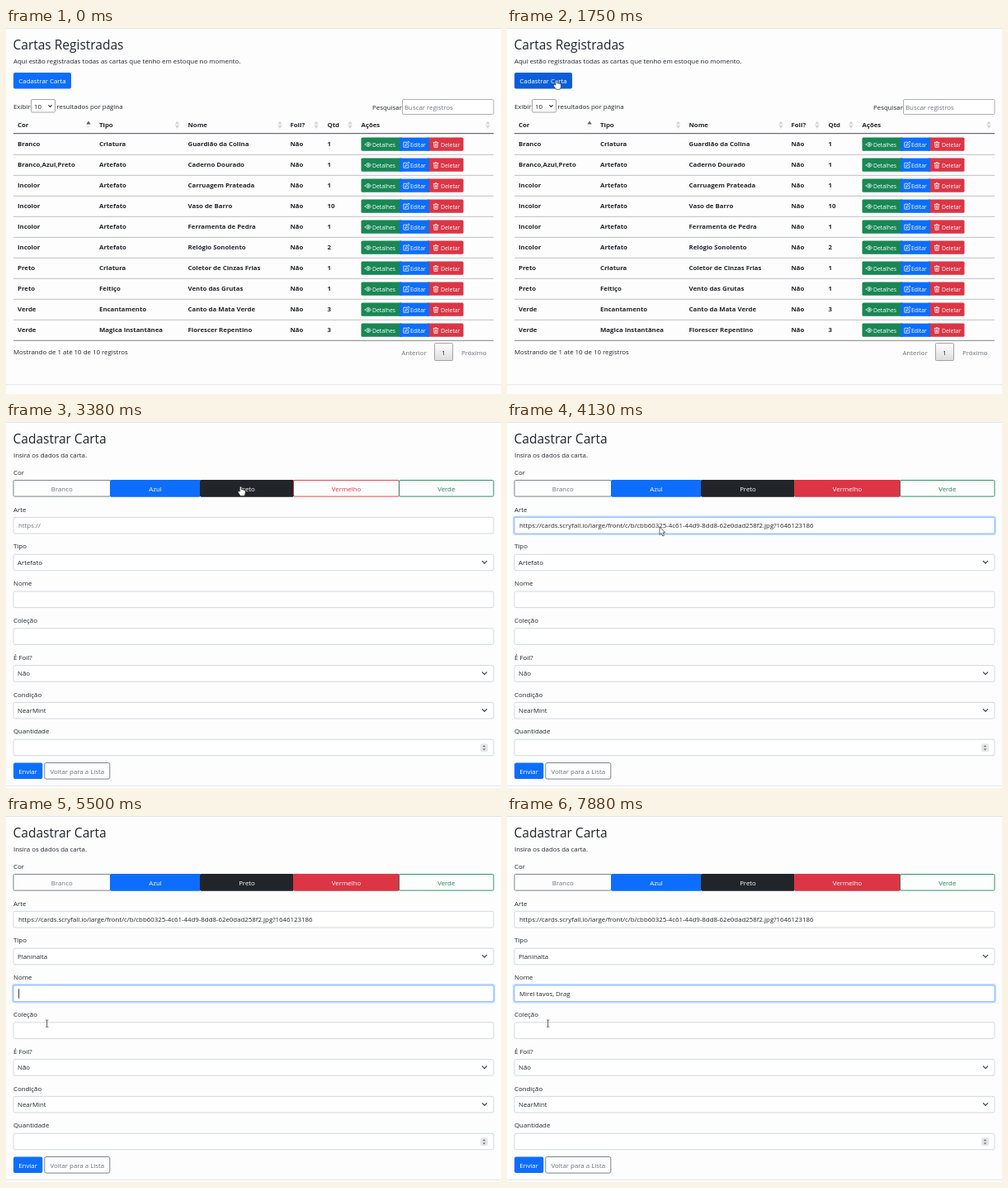
Write an HTML page that moves like this. It is 600 px wide and 443 px high and loops after 8000 ms.

```html
<!DOCTYPE html>
<html lang="pt-BR">
<head>
<meta charset="utf-8">
<title>Cartas</title>
<style>
  html, body { margin: 0; width: 100%; height: 100%; overflow: hidden; background: #fdfdfe; }
  svg { display: block; width: 100vw; height: 100vh; }
  text { font: 7.87px "Open Sans", "Noto Sans", sans-serif; fill: #212529; white-space: pre; }
  .title { font-size: 15.5px; }
  .bold { font-size: 7.82px; font-weight: 700; }
  .small { font-size: 6.85px; fill: #fff; }
  .white { fill: #fff; }
  .muted { fill: #6c757d; }
  .mid { text-anchor: middle; }
  .icon { fill: none; stroke: #fff; stroke-width: .75; stroke-linecap: round; stroke-linejoin: round; }
</style>
</head>
<body>
<svg id="stage" viewBox="0 0 600 443" xmlns="http://www.w3.org/2000/svg"></svg>
<script>
const LOOP = 8000;
const BLUE = '#0d6efd', GREEN = '#198754', RED = '#dc3545', GRAY = '#6c757d', DARK = '#212529';
const PAGE_SWITCH = 2000;

// Markup helpers; text is placed by its vertical centre.
const text = (x, cy, s, cls = '', extra = '') =>
  `<text x="${x}" y="${cy + 2.8}" class="${cls}" ${extra}>${s}</text>`;
const rect = (x, y, w, h, fill, stroke = 'none', r = 0, extra = '') =>
  `<rect x="${x}" y="${y}" width="${w}" height="${h}" rx="${r}" fill="${fill}" stroke="${stroke}" ${extra}/>`;
const line = (y, color, x1 = 9, x2 = 591, w = 1) =>
  `<path d="M${x1} ${y}H${x2}" stroke="${color}" stroke-width="${w}"/>`;
const chevron = (x, y, s = 2.7) =>
  `<path d="M${x - s} ${y - s / 2}l${s} ${s}l${s} ${-s}" fill="none" stroke="#343a40" stroke-width="1.1" stroke-linecap="round" stroke-linejoin="round"/>`;
const group = (id, body, extra = '') => `<g id="${id}" ${extra}>${body}</g>`;

// ---- List page ----
const columns = [['Cor', 14, 100], ['Tipo', 113, 207.5], ['Nome', 220.5, 332],
  ['Foil?', 344.5, 376], ['Qtd', 389.5, 417], ['Ações', 430.5, 584]];
const cards = [
  ['Branco', 'Criatura', 'Guardião da Colina', 1],
  ['Branco,Azul,Preto', 'Artefato', 'Caderno Dourado', 1],
  ['Incolor', 'Artefato', 'Carruagem Prateada', 1],
  ['Incolor', 'Artefato', 'Vaso de Barro', 10],
  ['Incolor', 'Artefato', 'Ferramenta de Pedra', 1],
  ['Incolor', 'Artefato', 'Relógio Sonolento', 2],
  ['Preto', 'Criatura', 'Coletor de Cinzas Frias', 1],
  ['Preto', 'Feitiço', 'Vento das Grutas', 1],
  ['Verde', 'Encantamento', 'Canto da Mata Verde', 3],
  ['Verde', 'Magica Instantânea', 'Florescer Repentino', 3]
];
const rowTop = i => 128 + 25 * i;

const eye = (x, y) => `<g class="icon"><path d="M${x - 3.6} ${y}q3.6 -5 7.2 0q-3.6 5 -7.2 0z"/><circle cx="${x}" cy="${y}" r="1.1"/></g>`;
const pencil = (x, y) => `<path class="icon" d="M${x + .5} ${y - 2.8}h-3.6v6h6v-3M${x - 1} ${y + 1.2}l.4 -1.7l3.5 -3.5l1.2 1.2l-3.5 3.5z"/>`;
const trash = (x, y) => `<path class="icon" d="M${x - 3} ${y - 2.4}h6M${x - 1} ${y - 2.6}v-.8h2v.8M${x - 2.3} ${y - 2.2}l.3 5.6h4l.3 -5.6M${x - .7} ${y - .8}v2.8M${x + .7} ${y - .8}v2.8"/>`;

function sortMark(x, active) {
  const up = `<path d="M${x - 2.7} 116.6l2.7 -4.2l2.7 4.2z" fill="${active ? '#5c5f66' : '#d5d6dc'}"/>`;
  const down = `<path d="M${x - 2.7} 117.8l2.7 4.2l2.7 -4.2z" fill="${active ? '#f0f0f3' : '#d5d6dc'}"/>`;
  return up + down;
}

function cardRow([color, type, name, count], i) {
  const y = rowTop(i), c = y + 12.2;
  const cells = [color, type, name, 'Não', count];
  return rect(9, y, 582, 25, '#eae8e9', 'none', 0, `id="row${i}" opacity="0"`) +
    cells.map((s, k) => text(columns[k][1], c, s, 'bold')).join('') +
    rect(430.5, y + 4.6, 50, 16.2, GREEN, 'none', 1.6) +
    rect(510, y + 4.6, 44.5, 16.2, RED, 'none', 1.6) +
    rect(477, y + 4.6, 36, 16.2, BLUE) +
    eye(439, y + 13) + pencil(485, y + 13) + trash(521, y + 13) +
    text(444, c + .7, 'Detalhes', 'small') + text(490, c + .7, 'Editar', 'small') + text(527, c + .7, 'Deletar', 'small') +
    line(y + 25.3, i === 9 ? '#858585' : '#bfc0c2');
}

const listPage = () =>
  text(8.5, 23.2, 'Cartas Registradas', 'title') +
  text(9, 40, 'Aqui estão registradas todas as cartas que tenho em estoque no momento.') +
  rect(9, 54, 70, 19.6, BLUE, 'none', 2, 'id="create"') +
  text(44, 64.2, 'Cadastrar Carta', 'white mid') +
  text(9, 95, 'Exibir') + rect(30.5, 86.5, 29, 15.5, '#fff', '#a5a5a5', 1.5) +
  text(34, 95, '10') + chevron(53.5, 94.6, 1.8) + text(61.5, 95, 'resultados por página') +
  text(444, 96, 'Pesquisar') + rect(480.5, 86.5, 110.5, 18, '#fff', '#b0b0b0', 1.5) +
  text(483, 96, 'Buscar registros', 'muted') +
  columns.map(([s, x, mark], i) => text(x, 117, s, 'bold') + sortMark(mark, i === 0)).join('') +
  cards.map(cardRow).join('') + line(127.7, '#4b4d50') +
  text(9, 392.5, 'Mostrando de 1 até 10 de 10 registros') +
  text(479.5, 392.8, 'Anterior', 'muted') +
  rect(519.5, 381.5, 22, 21, 'url(#pager)', '#a3a3a3', 1) +
  text(530.5, 392.8, '1', 'mid') + text(552, 392.8, 'Próximo', 'muted') +
  line(431.8, '#e4e6e9', 0, 600);

// ---- Form page ----
const labels = ['Arte', 'Tipo', 'Nome', 'Coleção', 'É Foil?', 'Condição', 'Quantidade'];
const selects = { 1: 'Artefato', 4: 'Não', 5: 'NearMint' };
const options = ['Artefato', 'Criatura', 'Encantamento', 'Magica Instantânea', 'Terreno', 'Planinalta', 'Feitiço'];
const fieldTop = i => 115.4 + 44.8 * i;
// name, left, right, color, time of filling
const colors = [['Branco', 9, 126.5, GRAY, 0], ['Azul', 126.5, 235.5, BLUE, 2740],
  ['Preto', 235.5, 348.5, DARK, 3190], ['Vermelho', 348.5, 476.5, RED, 3610],
  ['Verde', 476.5, 591, GREEN, 0]];

function formField(label, i) {
  const y = fieldTop(i);
  return text(9, y - 9.7, label) +
    rect(8, y - 1, 584, 21.6, 'none', '#c2dbfe', 2.6, `id="ring${i}" stroke-width="2" opacity="0"`) +
    rect(9, y, 582, 19.6, '#fff', '#ced4da', 2, `id="field${i}" stroke-width=".9"`) +
    (selects[i] ? text(14, y + 10, selects[i], '', `id="value${i}"`) + chevron(580, y + 9.6) : '');
}

function colorButton([name, x1, x2, color], i) {
  const c = (x1 + x2) / 2, w = x2 - x1;
  return rect(x1, 70.5, w, 19.6, 'none', color, 1.5, 'stroke-width=".9"') +
    text(c, 81, name, 'mid', `style="fill:${color}"`) +
    group('color' + i, rect(x1, 70.5, w, 19.6, color, color, 1, 'stroke-width=".9"') + text(c, 81, name, 'mid white'), 'opacity="0"');
}

const formPage = () =>
  text(8.5, 23.2, 'Cadastrar Carta', 'title') +
  text(9, 40, 'Insira os dados da carta.') + text(9, 60.7, 'Cor') +
  colors.map(colorButton).join('') + labels.map(formField).join('') +
  text(15, 125.6, '', '', 'id="art"') + text(15, 215.2, '', '', 'id="name"') +
  '<path id="caret" stroke="#212529" stroke-width=".9"/>' +
  rect(575, 389.3, 9, 10, '#e6e6e8', 'none', 2) +
  '<path d="M577.6 393.3l1.9 -2l1.9 2zM577.6 395.5l1.9 2l1.9 -2z" fill="#6f6f73"/>' +
  rect(9, 412.5, 35.3, 19.6, BLUE, 'none', 2) + text(26.6, 422.8, 'Enviar', 'white mid') +
  rect(46.8, 412.5, 79, 19.6, 'none', GRAY, 2, 'stroke-width=".9"') +
  text(86.3, 422.8, 'Voltar para a Lista', 'muted mid') +
  line(440.3, '#e0e3e6', 0, 600) +
  group('menu', rect(8.5, 180.5, 582, 120, '#fff', '#8a8d91', 0, 'stroke-width=".9"') +
    options.map((s, i) => text(12, 191 + 16.55 * i, s)).join(''));

const pointers = {
  arrow: '<path d="M0 0V9.4L2.2 7.5L3.8 11L5.4 10.3L3.9 6.9H6.8Z" fill="#fff" stroke="#333" stroke-width=".7"/>',
  hand: '<path d="M-.9 6V.8Q0 -.7 .9 .8V4Q2 3.2 2.6 4.3Q3.6 3.7 4.2 4.7Q5.4 4.3 5.6 5.6V8Q5.4 10 4.3 11.4H-.2L-3 7.6Q-3.7 6.2 -2.4 5.7Z" fill="#fff" stroke="#333" stroke-width=".7"/>',
  beam: '<path d="M-1.6 -4.2H-.5L0 -3.8L.5 -4.2H1.6M0 -3.8V3.8M-1.6 4.2H-.5L0 3.8L.5 4.2H1.6" fill="none" stroke="#333" stroke-width=".8"/>'
};

const stage = document.getElementById('stage');
stage.innerHTML =
  `<defs><linearGradient id="pager" x2="0" y2="1"><stop stop-color="#fff"/><stop offset="1" stop-color="#dcdcdc"/></linearGradient></defs>` +
  rect(0, 0, 600, 443, '#fdfdfe') + rect(0, 0, 600, 1, '#e2e6ea') +
  group('list', listPage()) + group('form', formPage()) +
  group('pointer', Object.keys(pointers).map(k => group(k, pointers[k])).join(''));

// ---- Motion ----
const url = 'https://cards.scryfall.io/large/front/c/b/cbb60325-4c61-44d9-8dd8-62e0dad258f2.jpg?1646123186';
const typedName = 'Mirel tavos, Drag';
const TYPE_START = 5950, KEY_TIME = 103;
// time, x, y, pointer used from then on
const path = [
  [130, 398, 372, 'arrow'], [500, 385, 300, 'arrow'], [900, 352, 190, 'arrow'],
  [1250, 339.5, 102.5, 'arrow'], [1640, 66, 66, 'hand'], [1800, 58, 62, 'hand'],
  [2000, 58, 64, 'hand'], [2250, 59, 101, 'hand'], [2500, 130, 98, 'hand'],
  [2750, 178, 79, 'hand'], [3000, 184, 79, 'hand'], [3250, 280, 78, 'hand'],
  [3380, 284.5, 78, 'hand'], [3620, 400, 80, 'hand'], [3760, 400, 80, 'arrow'],
  [3950, 190, 125, 'beam'], [4130, 185, 127, 'arrow'], [4330, 72, 171, 'arrow'],
  [4630, 63.5, 244.5, 'arrow'], [4900, 42, 272, 'arrow'], [5030, 42, 272, 'arrow'],
  [5270, 48, 214, 'beam'], [5330, 48, 214, 'beam'], [5480, 49.7, 251.2, 'beam'], [8000, 49.7, 251.2, 'beam']
];
// field index, focus time, blur time
const focuses = [[0, 3950, 4330], [1, 4330, 5300], [2, 5300, 9000]];

const $ = id => document.getElementById(id);
const set = (id, name, value) => $(id).setAttribute(name, value);
const show = (id, on) => set(id, 'display', on ? 'inline' : 'none');
const clamp = v => Math.max(0, Math.min(1, v));
const fade = (t, from) => clamp((t - from) / 150);
const between = (t, a, b) => t >= a && t < b;

function pointerAt(t) {
  let i = 0;
  while (i < path.length - 2 && t >= path[i + 1][0]) i++;
  const [t0, x0, y0, kind] = path[i], [t1, x1, y1] = path[i + 1];
  const p = clamp((t - t0) / (t1 - t0)), e = p * p * (3 - 2 * p);
  return { x: x0 + (x1 - x0) * e, y: y0 + (y1 - y0) * e, kind };
}

function drawList(t) {
  const lagged = pointerAt(t - 110).y;
  cards.forEach((_, i) => set('row' + i, 'opacity',
    between(t, 250, 1420) && between(lagged, rowTop(i), rowTop(i) + 25) ? 1 : 0));
  set('create', 'fill', t > 1620 ? '#0b5ed7' : BLUE);
}

function drawForm(t) {
  colors.forEach(([, , , , at], i) => set('color' + i, 'opacity', at ? fade(t, at) : 0));
  focuses.forEach(([i, on, off]) => {
    const level = fade(t, on) * (1 - fade(t, off));
    set('ring' + i, 'opacity', level);
    set('field' + i, 'stroke', level > .5 ? '#86b7fe' : '#ced4da');
  });
  $('art').textContent = t < 4130 ? 'https://' : url;
  $('art').style.fill = t < 4130 ? GRAY : DARK;
  $('value1').textContent = t < 5020 ? 'Artefato' : 'Planinalta';
  show('menu', between(t, 4340, 5020));

  const count = Math.max(0, Math.min(typedName.length, Math.floor((t - TYPE_START) / KEY_TIME)));
  $('name').textContent = typedName.slice(0, count);
  const x = 15.6 + (count ? $('name').getComputedTextLength() : 0);
  set('caret', 'd', `M${x} 209.2V220.8`);
  show('caret', between(t, 5300, 5830) || between(t, TYPE_START, 7860));
}

function draw(t) {
  const onList = t < PAGE_SWITCH;
  show('list', onList);
  show('form', !onList);
  if (onList) drawList(t); else drawForm(t);
  const { x, y, kind } = pointerAt(t);
  show('pointer', t >= 130);
  set('pointer', 'transform', `translate(${x} ${y})`);
  Object.keys(pointers).forEach(k => show(k, k === kind));
}

const start = performance.now();
function tick() {
  draw((performance.now() - start) % LOOP);
  requestAnimationFrame(tick);
}
tick();
</script>
</body>
</html>
```
